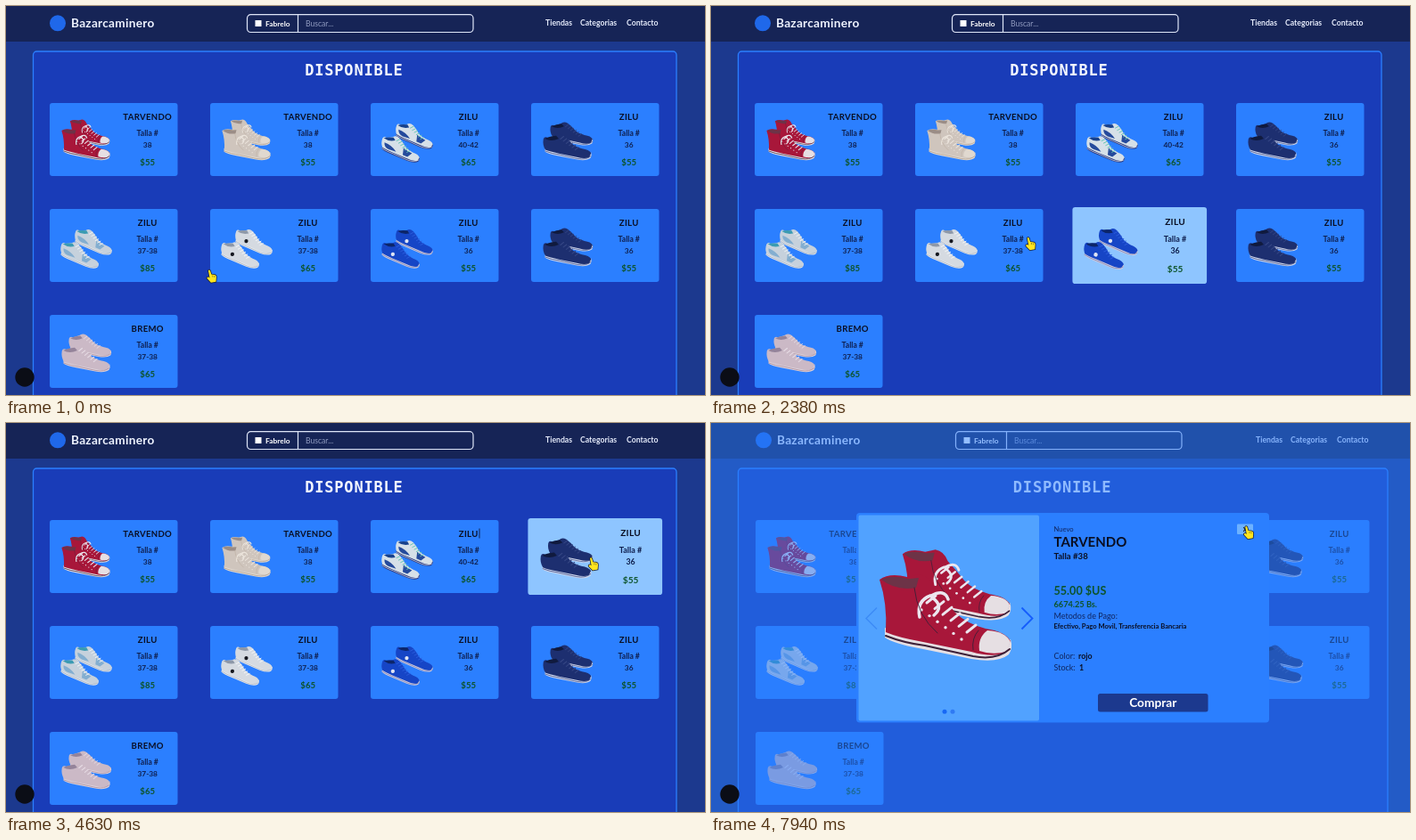
Recreate the animation shown at these times as an HTML page with a canvas. Size 784x437 px, loop 8 s.

```html
<!DOCTYPE html>
<html lang="es">
<head>
<meta charset="utf-8">
<title>Tienda</title>
<style>
  html, body { margin: 0; width: 100%; height: 100%; overflow: hidden; background: #1c398e; }
  canvas { display: block; width: 784px; height: 437px; }
</style>
</head>
<body>
<canvas id="stage"></canvas>
<script>
const W = 784, H = 437, LOOP = 8000;
const canvas = document.getElementById('stage');
const ctx = canvas.getContext('2d');
const ratio = window.devicePixelRatio || 1;
canvas.width = W * ratio;
canvas.height = H * ratio;

const BLUE = '#2b7fff', NAVY = '#1c398e', GREEN = '#0d542b', INK = '#0a0f24';
const SANS = 'Lato, "Open Sans", sans-serif';
const CARD_W = 143.5, CARD_H = 82;

// Shoes share a 150 x 130 box; `steep` pairs stand more upright.
const shoes = {
  red: { high: true, upper: '#a8173a', lining: '#6d3347', sole: '#e6dfe3', stripe: '#3d2038', lace: '#ece6ee' },
  cream: { high: true, upper: '#cfc5bd', lining: '#9b8d86', sole: '#e0d8cf', stripe: '#b09d8c', lace: '#ebe4dc' },
  sport: { steep: true, upper: '#d6e0e8', lining: '#17418c', sole: '#2b3b83', stripe: '#e4e6ee', lace: '#66c8b4', panel: '#254a9c' },
  navy: { upper: '#1d2f70', lining: '#101a3e', sole: '#cdd5ea', stripe: '#3b4b86', lace: '#354684' },
  ice: { steep: true, upper: '#c6d1dc', lining: '#3b9bb2', sole: '#dfe2e8', stripe: '#9aaabd', lace: '#eef2f6', panel: '#83aed0' },
  white: { steep: true, upper: '#d5dae1', lining: '#8e98a8', sole: '#e4e7eb', stripe: '#a9b0bd', lace: '#f4f6f9', dot: '#15171f' },
  royal: { steep: true, upper: '#1645c6', lining: '#0c2569', sole: '#cfcadb', stripe: '#6d78b6', lace: '#2b5cdc', dot: '#dfe4f4' },
  pink: { upper: '#cbb9c6', lining: '#94839a', sole: '#dbd0d8', stripe: '#ab8a9a', lace: '#e6dbe4' }
};

const products = [
  ['TARVENDO', '38', 55, 'red'],
  ['TARVENDO', '38', 55, 'cream'],
  ['ZILU', '40-42', 65, 'sport'],
  ['ZILU', '36', 55, 'navy'],
  ['ZILU', '37-38', 85, 'ice'],
  ['ZILU', '37-38', 65, 'white'],
  ['ZILU', '36', 55, 'royal'],
  ['ZILU', '36', 55, 'navy'],
  ['BREMO', '37-38', 65, 'pink']
].map(([brand, size, price, shoe]) => ({ brand, size, price, shoe: shoes[shoe] }));

// Pointer path: time, x, y
const route = [
  [0, 229, 297], [240, 160, 180], [420, 150, 160], [560, 210, 158], [740, 300, 160],
  [900, 390, 162], [1080, 485, 164], [1240, 548, 165], [1265, 590, 166], [1310, 604, 167],
  [1580, 737, 175], [1700, 736, 225], [1860, 690, 262], [2040, 570, 268], [2180, 490, 267],
  [2310, 412, 266], [2340, 371, 263], [2380, 357, 260], [2620, 230, 266], [2680, 190, 268],
  [2860, 130, 275], [3060, 120, 350], [3220, 125, 385], [3400, 165, 360], [3500, 300, 265],
  [3560, 484, 137], [3700, 528, 126], [4050, 540, 128], [4200, 600, 140], [4420, 670, 150],
  [4740, 650, 152], [4940, 570, 148], [5100, 500, 142], [5300, 390, 145], [5450, 265, 150],
  [5530, 229, 152], [5625, 192, 156], [5690, 148, 162], [5800, 135, 160], [6250, 135, 160],
  [6700, 420, 270], [6940, 474, 276], [7100, 477, 275], [7370, 515, 240], [7800, 601, 116],
  [8000, 601, 116]
];

const MODAL_OPEN = 6080, CARET_FROM = 3850;

const wrap = t => ((t % LOOP) + LOOP) % LOOP;
const clamp = v => Math.max(0, Math.min(1, v));
const mix = (a, b, p) => a + (b - a) * p;

function pointerAt(t) {
  const i = route.findIndex(k => k[0] > t);
  const [t0, x0, y0] = route[i - 1], [t1, x1, y1] = route[i];
  const p = (t - t0) / (t1 - t0);
  return [mix(x0, x1, p), mix(y0, y1, p)];
}

function cardPosition(i, shifted) {
  const col = i % 4, row = Math.floor(i / 4);
  return shifted ? [50 + col * 181.67, 109 + row * 119] : [49 + col * 180, 109 + row * 119];
}

function cardUnderPointer(t) {
  if (t >= MODAL_OPEN) return -1;
  const [px, py] = pointerAt(t);
  return products.findIndex((_, i) => {
    const [x, y] = cardPosition(i);
    return px >= x && px <= x + CARD_W && py >= y && py <= y + CARD_H;
  });
}

function overClose(t) {
  const [x, y] = pointerAt(t);
  return t >= MODAL_OPEN && x > 589 && x < 608 && y > 113 && y < 126;
}

// Each card eases over 150 ms, starting 70 ms after the pointer enters or leaves.
function hoverLevels(t) {
  const levels = products.map(() => 0), samples = 30;
  for (let s = 0; s < samples; s++) {
    const i = cardUnderPointer(wrap(t - 70 - 150 * (s + 0.5) / samples));
    if (i >= 0) levels[i] += 1 / samples;
  }
  return levels.map(v => v * v * (3 - 2 * v));
}

function text(str, x, y, size, color, { weight = 700, align = 'left', font = SANS, spacing = 0 } = {}) {
  ctx.font = `${weight} ${size}px ${font}`;
  ctx.letterSpacing = spacing + 'px';
  ctx.textAlign = align;
  ctx.fillStyle = color;
  ctx.fillText(str, x, y);
}

function box(x, y, w, h, r, fill, stroke, line = 1.2) {
  ctx.beginPath();
  ctx.roundRect(x, y, w, h, r);
  if (fill) { ctx.fillStyle = fill; ctx.fill(); }
  if (stroke) { ctx.strokeStyle = stroke; ctx.lineWidth = line; ctx.stroke(); }
}

function circle(x, y, r, fill) {
  ctx.beginPath();
  ctx.arc(x, y, r, 0, Math.PI * 2);
  ctx.fillStyle = fill;
  ctx.fill();
}

function line(d, color, width) {
  ctx.strokeStyle = color;
  ctx.lineWidth = width;
  ctx.stroke(new Path2D(d));
}

function shape(d, fill) {
  ctx.fillStyle = fill;
  ctx.fill(new Path2D(d));
}

function drawShoe(s) {
  ctx.lineCap = ctx.lineJoin = 'round';
  const foot = 'Q98 87 120 93 Q142 96 148 107 L142 120 Q128 126 104 119 L50 108 Q22 103 8 97';
  shape('M7 92 Q30 100 55 104 L108 116 Q134 120 148 105 Q151 115 146 122 Q134 132 104 127 L45 115 Q18 110 7 103 Z', s.sole);
  if (s.high) {
    shape(`M1 38 Q12 30 32 35 L46 32 Q58 34 63 48 Q74 60 86 75 ${foot} Q10 65 1 38 Z`, s.upper);
    shape('M3 38 Q14 32 34 37 L45 36 L42 47 Q20 51 3 38 Z', s.lining);
    shape('M122 95 Q142 96 148 108 L143 119 Q128 123 113 118 Q111 103 122 95 Z', s.sole);
  } else {
    shape(`M2 64 Q5 54 16 60 L38 53 Q48 43 62 52 Q76 62 88 77 ${foot} Q-1 82 2 64 Z`, s.upper);
    shape('M6 63 Q18 56 41 54 L49 63 Q26 73 6 63 Z', s.lining);
  }
  if (s.panel) shape('M12 78 Q40 82 60 103 L32 100 Q14 96 12 78 Z M84 84 Q98 92 118 97 L104 113 L86 109 Z', s.panel);
  line('M8 101 Q28 109 52 112 L106 124 Q132 129 147 116', s.stripe, 2);
  for (let i = 0; i < 6; i++) {
    const x = 54 + i * 9, y = 56 + i * 6.6;
    line(`M${x} ${y + 8} L${x + 10} ${y}`, s.lace, 3);
    if (s.high) circle(x - 6, y + 16, 1.7, s.lace);
  }
  if (s.high) {
    line('M58 56 Q42 62 46 80 M60 58 Q74 68 62 78 M59 56 Q74 48 78 60', s.lace, 3.5);
    line('M40 47 Q43 78 66 98 M112 95 Q104 104 106 117', s.stripe, 0.9);
  }
  if (s.dot) circle(46, 93, 7, s.dot);
}

function drawPair(s, x, y, scale) {
  ctx.save();
  ctx.translate(x, y);
  ctx.scale(scale, scale);
  const places = s.steep ? [[53, -30, 0.82], [10, 8, 0.84]]
    : s.high ? [[26, -22, 0.82], [0, 0, 1]]
    : [[22, -30, 0.88], [0, 0, 1]];
  for (const [dx, dy, k] of places) {
    ctx.save();
    ctx.translate(dx, dy);
    if (s.steep) ctx.rotate(0.2);
    ctx.scale(k, k);
    drawShoe(s);
    ctx.restore();
  }
  ctx.restore();
}

function drawCard(p, x, y, level) {
  const zoom = 1 + 0.05 * level, mid = { align: 'center' };
  ctx.save();
  ctx.translate(x + CARD_W / 2, y + CARD_H / 2);
  ctx.scale(zoom, zoom);
  ctx.translate(-CARD_W / 2, -CARD_H / 2);
  const fill = `rgb(${mix(43, 142, level)},${mix(127, 197, level)},255)`;
  box(0, 0, CARD_W, CARD_H, 3, fill);
  drawPair(p.shoe, 13, 17, 0.367);
  text(p.brand, 109.7, 18.8, 9.6, INK, { align: 'center', spacing: 0.3 });
  text('Talla #', 109.7, 37.3, 8.6, '#0f2050', mid);
  text(p.size, 109.7, 49.8, 8.4, '#0f2050', mid);
  text('$' + p.price, 109.7, 69.5, 9.6, GREEN, mid);
  ctx.restore();
}

function drawHeader(shifted) {
  const dx = shifted ? 1 : 0, search = shifted ? 4 : 0, nav = shifted ? 6 : 0;
  ctx.fillStyle = '#162456';
  ctx.fillRect(0, 0, W, 40);
  circle(58 + dx, 19.3, 9, '#1f68ea');
  text('Bazarcaminero', 73 + dx, 24, 13.6, '#eef3ff', { spacing: 0.3 });
  box(270.5 + search, 9.7, 253.5, 19.8, 4, null, '#dfe6f8');
  line(`M${327.5 + search} 10 V29.5`, '#dfe6f8', 1.2);
  box(279.5 + search, 16, 7, 7, 0, '#ffffff');
  text('Fabrelo', 291 + search, 22.6, 8.4, '#ffffff');
  text('Buscar...', 336 + search, 22.6, 8.6, '#8f9abf', { weight: 400 });
  [['Tiendas', 605], ['Categorias', 644], ['Contacto', 696]].forEach(([label, x]) =>
    text(label, x + nav, 22.4, 8.7, '#e4eafa'));
}

function drawPage(t, shifted) {
  ctx.fillStyle = NAVY;
  ctx.fillRect(0, 0, W, H);
  drawHeader(shifted);
  box(30.5, 51, shifted ? 728.5 : 721.5, 420, 4, '#193cb8', BLUE, 1.3);
  text('DISPONIBLE', shifted ? 394 : 390.4, 78, 17, '#f4f7ff',
    { align: 'center', font: '"DejaVu Sans Mono", monospace', spacing: 0.8 });
  const levels = hoverLevels(t);
  products.forEach((p, i) => drawCard(p, ...cardPosition(i, shifted), levels[i]));
  if (t >= CARET_FROM && !shifted) line('M531 118.5 V129.5', INK, 0.8);
}

function drawModal(p, t) {
  const plain = { weight: 400 }, soft = '#10255f';
  box(163, 101, 463, 235.5, 4, BLUE);
  box(165.5, 103.5, 202.5, 231, 2, '#51a2ff');
  drawPair(p.shoe, 188, 138, 1);
  line('M186 207.5 L174 219.5 L186 231.5', '#3d8bf6', 1.5);
  line('M348.5 207.5 L360.5 219.5 L348.5 231.5', '#155dfc', 1.8);
  circle(262, 324.3, 2.5, '#1768f5');
  circle(271, 324.3, 2.5, '#2f7af3');
  text('Nuevo', 384.5, 121.8, 7.6, soft, plain);
  text(p.brand, 384.5, 139, 15, INK);
  text('Talla #' + p.size, 384.5, 153.4, 9.6, INK);
  text(p.price.toFixed(2) + ' $US', 384.5, 193, 12.6, GREEN);
  text((p.price * 121.35).toFixed(2) + ' Bs.', 384.5, 206.5, 9.2, GREEN);
  text('Metodos de Pago:', 384.5, 219.8, 9, soft, plain);
  text('Efectivo, Pago Movil, Transferencia Bancaria', 384.5, 231, 7.6, INK);
  text('Color:', 384.5, 265.4, 9, soft, plain);
  text('rojo', 412, 265.4, 8.8, INK);
  text('Stock:', 384.5, 277.6, 9, soft, plain);
  text('1', 413, 277.6, 8.8, INK);
  box(434, 304, 123.5, 20.5, 2.5, NAVY);
  text('Comprar', 495.7, 319, 13.7, '#ffffff', { align: 'center' });
  if (overClose(wrap(t - 35))) box(590, 113.5, 18, 11.5, 1, '#6db2ff');
  text('x', 599, 121.8, 8.8, INK, { align: 'center' });
}

function drawPointer(t) {
  const [x, y] = pointerAt(t), before = wrap(t - 35);
  const hand = cardUnderPointer(before) >= 0 || overClose(before);
  const outline = hand
    ? 'M-1.8 .8 Q-.8 -.8 .3 .7 L1.6 5 L5.6 5.4 Q7.4 6 7.2 8.2 L6.8 13.3 L1.2 14.2 L-3.2 9.6 Q-3.6 7.6 -1.4 8 L-.2 9 Z'
    : 'M0 0 L0 9.8 L2.2 7.9 L4 11.8 L5.8 11 L4.1 7.3 L7 7.1 Z';
  ctx.save();
  ctx.translate(x, y);
  ctx.lineJoin = 'round';
  line(outline, '#17203c', 1.5);
  shape(outline, '#ffe51f');
  if (hand) line('M3 6 V8 M5 6.3 V8.3', '#5d5720', 0.6);
  ctx.restore();
}

function draw(now) {
  const t = wrap(now), modalShown = t >= MODAL_OPEN;
  ctx.setTransform(ratio, 0, 0, ratio, 0, 0);
  drawPage(t, modalShown);
  if (modalShown) {
    const fade = clamp((t - MODAL_OPEN) / 120);
    ctx.globalAlpha = 0.5 * fade;
    ctx.fillStyle = BLUE;
    ctx.fillRect(0, 0, W, H);
    ctx.globalAlpha = fade;
    drawModal(products[0], t);
    ctx.globalAlpha = 1;
  }
  circle(21, 417, 10.7, '#0b0d16');
  drawPointer(t);
}

const start = performance.now();
function tick() {
  draw(performance.now() - start);
  requestAnimationFrame(tick);
}
tick();
</script>
</body>
</html>
```
